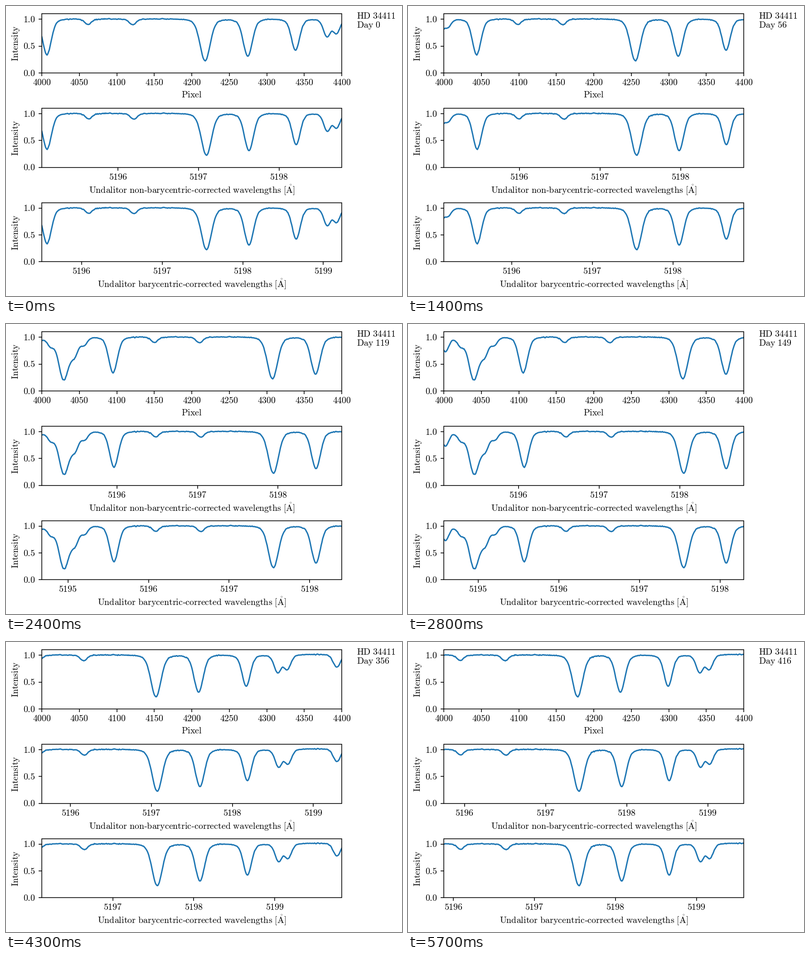
These frames come from a looping animation (874x641 px, 5800 ms). A matplotlib script:

```python
import numpy as np
import matplotlib.pyplot as plt
from matplotlib.animation import FuncAnimation
from matplotlib.patches import Rectangle

plt.rcParams["mathtext.fontset"] = "cm"

W, H, DPI = 874, 641, 144
FRAMES, INTERVAL = 58, 100
LEFT, RIGHT = 79, 741.2
WIDTH = RIGHT - LEFT
BOTTOMS = 148 + 208.7 * np.arange(3)
HEIGHT, UNIT = 130.6, 130.6 / 1.1
TICK, SIZE = 7, 9.96
SCALE = 178  # screen pixels per angstrom

# Absorption lines: wavelength - 5190 and depth
LINES = [(4.595, .27), (4.786, .14), (4.953, .79), (5.089, .29), (5.207, .14),
         (5.572, .66), (6.090, .10), (6.649, .11), (7.549, .78), (8.077, .69),
         (8.663, .58), (9.047, .32), (9.165, .26), (9.767, .24)]

# Step and observation day, with a long gap in the middle
NIGHTS = [(0, 0), (8, 24), (17, 72), (20, 89.9), (28, 149), (31, 165),
          (32, 318), (36, 333), (43, 356), (57, 416)]

U = np.linspace(0, 1, 401)
BEND = U + .018 * U * (1 - U)
GRID = np.arange(4.3, 10.3, .0093)
NOISE = np.random.default_rng(4).normal(0, .0045, GRID.size)


def gauss(x, sigma):
    return np.exp(-.5 * (x / sigma) ** 2)


def spectrum(lam):
    """Deeper lines are broader; each has a core and a faint wing."""
    flux = 1.004 + .011 / (1 + np.exp((9.2 - lam) / .08))
    for mu, depth in LINES:
        x = (lam - mu) * SCALE
        sigma = 7.2 + 7.2 * depth ** 3
        flux -= depth * (.89 * gauss(x, sigma) + .11 * gauss(x, 2.1 * sigma))
    return flux + np.interp(lam, GRID, NOISE)


def barycentric_shift(day):
    return .499 * np.cos(2 * np.pi * (day + 23.1) / 365.25) - .008


def detector_range(step, day):
    """First wavelength and span; the instrument was moved twice."""
    start = 5.055 + .00012 * day if step < 32 else 5.6475 if step < 50 else 5.743
    return start, 3.722 - .03 * (start - 5.055)


def roman(s):
    for old, new in ((" ", r"\ "), ("-", "\u2010"), ("Å", r"\mathring{A}")):
        s = s.replace(old, new)
    return rf"$\mathrm{{{s}}}$"


fig = plt.figure(figsize=(W / DPI, H / DPI), dpi=DPI, facecolor="white")
ax = fig.add_axes([0, 0, 1, 1])
ax.set(xlim=(0, W), ylim=(H, 0))
ax.axis("off")


def label(x, y, s, ha="center", **kw):
    return ax.text(x, y, roman(s), ha=ha, va="baseline", size=SIZE,
                   color="black", **kw)


def tick(x, y, dx, dy):
    return ax.plot([x, x + dx], [y, y + dy], color="black", lw=.8,
                   solid_capstyle="butt")[0]


def make_panel(bottom, title, drop):
    frame = ax.add_patch(Rectangle((LEFT, bottom - HEIGHT), WIDTH, HEIGHT,
                                   fill=False, ec="black", lw=.8, zorder=3))
    for v in (0, .5, 1):
        y = bottom - v * UNIT
        tick(LEFT, y, -TICK, 0)
        label(64.6, y + 6.6, f"{v:.1f}", "right")
    label(27.4, bottom - HEIGHT / 2, "Intensity", rotation=90,
          rotation_mode="anchor")
    label((LEFT + RIGHT) / 2, bottom + drop, title)
    curve, = ax.plot([], [], color="#1f77b4", lw=1.5)
    curve.set_clip_path(frame)
    return curve


TITLES = ("Pixel",
          "Undalitor non-barycentric-corrected wavelengths [Å]",
          "Undalitor barycentric-corrected wavelengths [Å]")
curves = [make_panel(b, t, 54 if t == "Pixel" else 57)
          for b, t in zip(BOTTOMS, TITLES)]

for k in range(9):
    x = LEFT + WIDTH * k / 8
    tick(x, BOTTOMS[0], 0, TICK)
    label(x, BOTTOMS[0] + 27, str(4000 + 50 * k))

wave_ticks = [[(n, tick(0, b, 0, TICK), label(0, b + 27, str(5190 + n)))
               for n in range(4, 11)] for b in BOTTOMS[1:]]

label(773.5, 28, "HD 34411", "left")
day_text = label(773.5, 48.5, "Day 0", "left")


def update(i):
    day = np.interp(i, *zip(*NIGHTS)) + 1e-6
    start, span = detector_range(i, day)
    shift = barycentric_shift(day)

    flux = spectrum(start + span * BEND + shift)
    for curve, u, bottom in zip(curves, (U, BEND, BEND), BOTTOMS):
        curve.set_data(LEFT + WIDTH * u, bottom - UNIT * flux)

    for marks, first in zip(wave_ticks, (start, start + shift)):
        for n, mark, text in marks:
            x = LEFT + WIDTH * (n - first) / span
            mark.set_xdata([x, x])
            text.set_x(x)
            for part in (mark, text):
                part.set_visible(LEFT <= x <= RIGHT)

    day_text.set_text(roman(f"Day {int(day)}"))
    return curves


anim = FuncAnimation(fig, update, frames=FRAMES, interval=INTERVAL,
                     init_func=lambda: update(0), repeat=True, repeat_delay=0)
plt.show()
```
